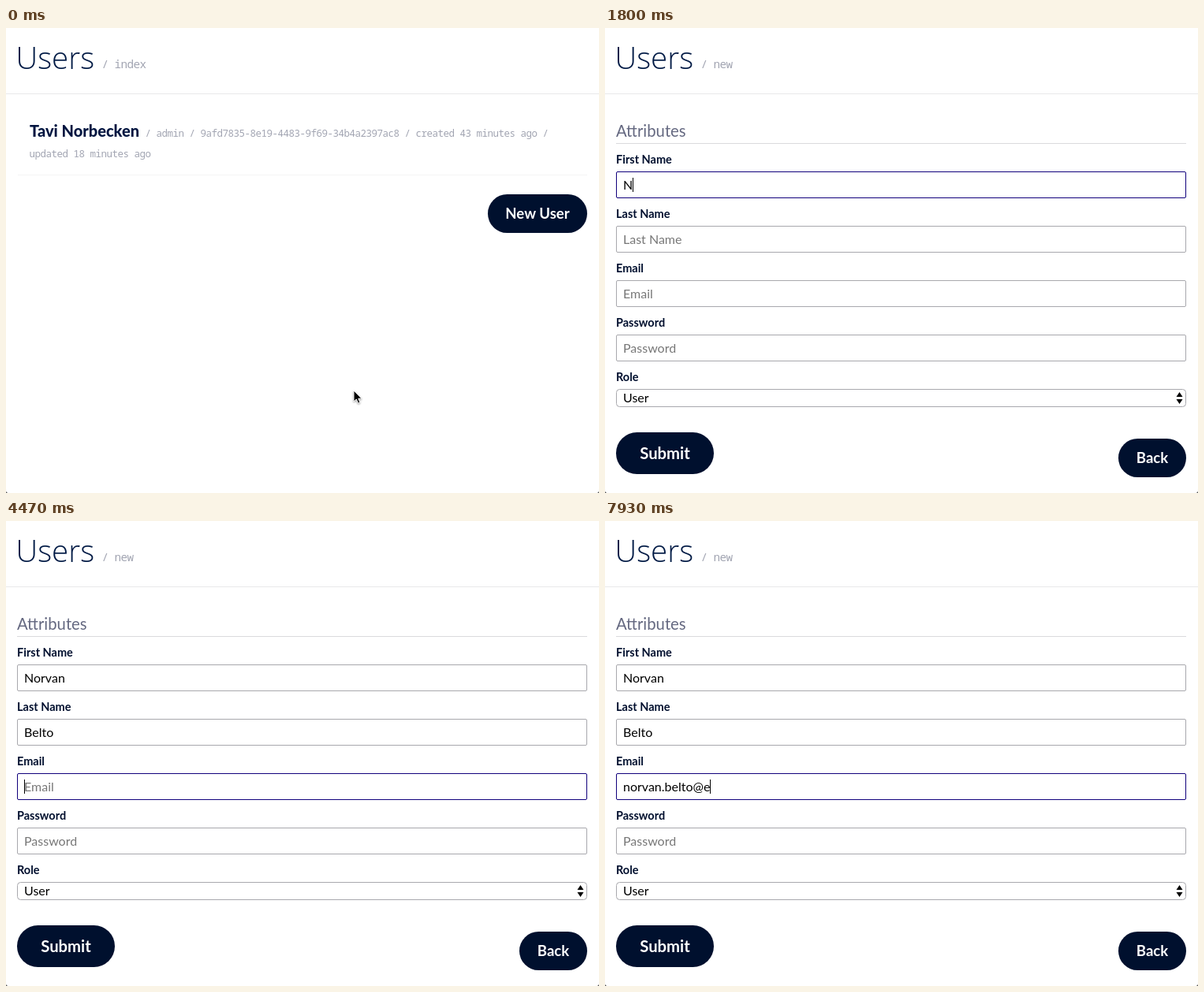
Recreate the animation shown at these times as an HTML page. Size 752 px wide and 590 px high, loop 8 s.

```html
<!DOCTYPE html>
<html lang="en">
<head>
<meta charset="utf-8">
<title>Users</title>
<style>
  html, body { margin: 0; width: 100%; height: 100%; overflow: hidden; background: #fff; }
  svg { display: block; width: 100%; height: 100%; font-family: Lato, "Open Sans", sans-serif; font-size: 16px; }
  .title { font: 300 38.5px "Open Sans", "Noto Sans", sans-serif; fill: #001a45; }
  .mono { font: 500 12.5px "Noto Sans Mono", "DejaVu Sans Mono", monospace; letter-spacing: -.04em; fill: #a2a5b2; }
  .crumb { font-size: 14.3px; }
  .name { font-size: 20px; font-weight: 800; fill: #001540; }
  .heading { font-size: 20.3px; fill: #646880; }
  .label { font-size: 14.5px; font-weight: 700; fill: #000f2e; }
  .button rect { fill: #00102e; }
  .button text { fill: #fff; font-weight: 700; text-anchor: middle; }
  .box { fill: #fff; stroke: #a8a8ad; }
  .box.focus { stroke: #10007c; }
  .placeholder { fill: #777; }
</style>
</head>
<body>
<svg id="stage" viewBox="0 0 752 590">
  <rect width="752" height="590" fill="#fff"/>
  <text class="title" x="12.5" y="51.5">Users</text>
  <text class="mono crumb" id="crumb" x="121.5" y="51" xml:space="preserve"></text>
  <path d="M0 83.5H752" stroke="#e8e8ea"/>

  <g id="indexPage">
    <text class="name" x="30" y="138">Tavi Norbecken</text>
    <text class="mono" x="176.5" y="138">/ admin / 9afd7835-8e19-4483-9f69-34b4a2397ac8 / created 43 minutes ago /</text>
    <text class="mono" x="29.5" y="164">updated 18 minutes ago</text>
    <path d="M15 186.5H737" stroke="#f4f4f5"/>
  </g>

  <g id="formPage">
    <text class="heading" x="14" y="138">Attributes</text>
    <path d="M14 146.5H737" stroke="#dadadd"/>
    <g id="fields"></g>
    <text class="label" x="14" y="448">Role</text>
    <rect class="box" x="14.5" y="458.5" width="722" height="22" rx="4"/>
    <text x="23" y="475">User</text>
    <path d="M724.5 468L728.5 462L732.5 468ZM724.5 471L728.5 477L732.5 471Z"/>
    <rect id="caret" width="1" height="18"/>
  </g>

  <g id="ring" fill="none">
    <circle r="30.8" stroke="#f4f0e4"/>
    <circle r="29" stroke="#000" stroke-width="3"/>
    <circle r="26.8" stroke="#f4f0e4" stroke-width="1.3"/>
  </g>
  <g id="pointer">
    <path id="arrow" d="M0 0V14L3.3 11L5.6 16.2L8 15.2L5.8 10.2H10Z" stroke="#fff" stroke-width="1"
          style="filter: drop-shadow(0 1px 1px #0006)"/>
    <path id="hand" d="M-1 .5Q.5 -1 1.6 1L3.2 5Q4.4 3.7 5.5 5Q6.8 4 7.8 5.5Q9.4 5 9.8 7L9.5 11L8.3 15H1.8L-2.5 10Q-3.3 7.6 -1 8.2L.5 9.2Z
          M3.5 9V12.5M5.5 9V12.5M7.4 9V12.5" fill="#fff" stroke="#000"/>
  </g>
  <path d="M0 588V590H2ZM752 588V590H750Z" fill="#555"/>
</svg>
<script>
const LOOP = 8000, PAGE_CHANGE = 1000;
const CLICK = { from: 670, to: 930 };
const BACKSPACE = '<';
const $ = id => document.getElementById(id);

function add(parent, tag, attributes, text = '') {
  const node = document.createElementNS('http://www.w3.org/2000/svg', tag);
  for (const key in attributes) node.setAttribute(key, attributes[key]);
  node.textContent = text;
  return parent.appendChild(node);
}

function addButton(page, text, x, y, width, height, size) {
  const group = add(page, 'g', { class: 'button' });
  add(group, 'rect', { x, y, width, height, rx: height / 2 });
  add(group, 'text', { x: x + width / 2, y: y + height / 2 + size * .35, 'font-size': size }, text);
}
addButton($('indexPage'), 'New User', 611, 211, 126, 49, 18.6);
addButton($('formPage'), 'Submit', 14, 513, 124, 53, 20.3);
addButton($('formPage'), 'Back', 651, 521, 86, 49, 18.6);

// Each field gets focus at a time, then one keystroke per entry in times.
const fields = [
  { label: 'First Name', focus: PAGE_CHANGE, keys: 'Norvan', times: [1730, 1870, 2000, 2070, 2200, 2330] },
  { label: 'Last Name', focus: 2470, keys: 'Belto', times: [2670, 2800, 2930, 3000, 3130] },
  { label: 'Email', focus: 3270, keys: 'norvan.bet<lto@e',
    times: [4670, 4800, 4930, 5070, 5200, 5330, 5470, 5670, 5800, 6070, 6730, 6870, 7000, 7270, 7530, 7870] },
  { label: 'Password', focus: Infinity, keys: '', times: [] }
];
fields.forEach((field, i) => {
  field.top = 182 + i * 69;
  add($('fields'), 'text', { class: 'label', x: 14, y: field.top - 10 }, field.label);
  field.box = add($('fields'), 'rect', { class: 'box', x: 14.5, y: field.top + .5, width: 722, height: 33, rx: 1.5 });
  field.text = add($('fields'), 'text', { x: 23, y: field.top + 23 });
});

const show = (node, visible) => node.setAttribute('visibility', visible ? 'visible' : 'hidden');
const place = (node, x, y) => node.setAttribute('transform', `translate(${x} ${y})`);

function drawForm(t) {
  const active = fields.filter(field => t >= field.focus).pop();
  for (const field of fields) {
    const count = field.times.filter(time => time <= t).length;
    let value = '';
    for (const key of field.keys.slice(0, count)) value = key === BACKSPACE ? value.slice(0, -1) : value + key;
    field.text.textContent = value || field.label;
    field.text.setAttribute('class', value ? '' : 'placeholder');
    field.box.classList.toggle('focus', field === active);
    if (field !== active) continue;

    const lastKey = count ? field.times[count - 1] : field.focus;
    $('caret').setAttribute('x', 23 + (value ? Math.round(field.text.getComputedTextLength()) : 0));
    $('caret').setAttribute('y', field.top + 8);
    show($('caret'), (t - lastKey) % 1000 < 500);
  }
}

function drawPointer(t) {
  const p = Math.min(1, Math.max(0, (t - 70) / 460));
  const eased = p * p * (3 - 2 * p);
  const x = 441 + 239 * eased, y = 460 - 216 * eased;
  const overButton = t < PAGE_CHANGE && x > 611 && y < 260;
  const visible = t < fields[0].times[0];
  place($('pointer'), x, y);
  show($('arrow'), visible && !overButton);
  show($('hand'), visible && overButton);
  place($('ring'), 681, 241.5);
  show($('ring'), t >= CLICK.from && t < CLICK.to);
}

function draw(now) {
  const t = now % LOOP, onForm = t >= PAGE_CHANGE;
  $('indexPage').style.display = onForm ? 'none' : '';
  $('formPage').style.display = onForm ? '' : 'none';
  $('crumb').textContent = onForm ? '/ new' : '/ index';
  if (onForm) drawForm(t);
  drawPointer(t);
}

const start = performance.now();
function tick() {
  draw(performance.now() - start);
  requestAnimationFrame(tick);
}
tick();
</script>
</body>
</html>
```
